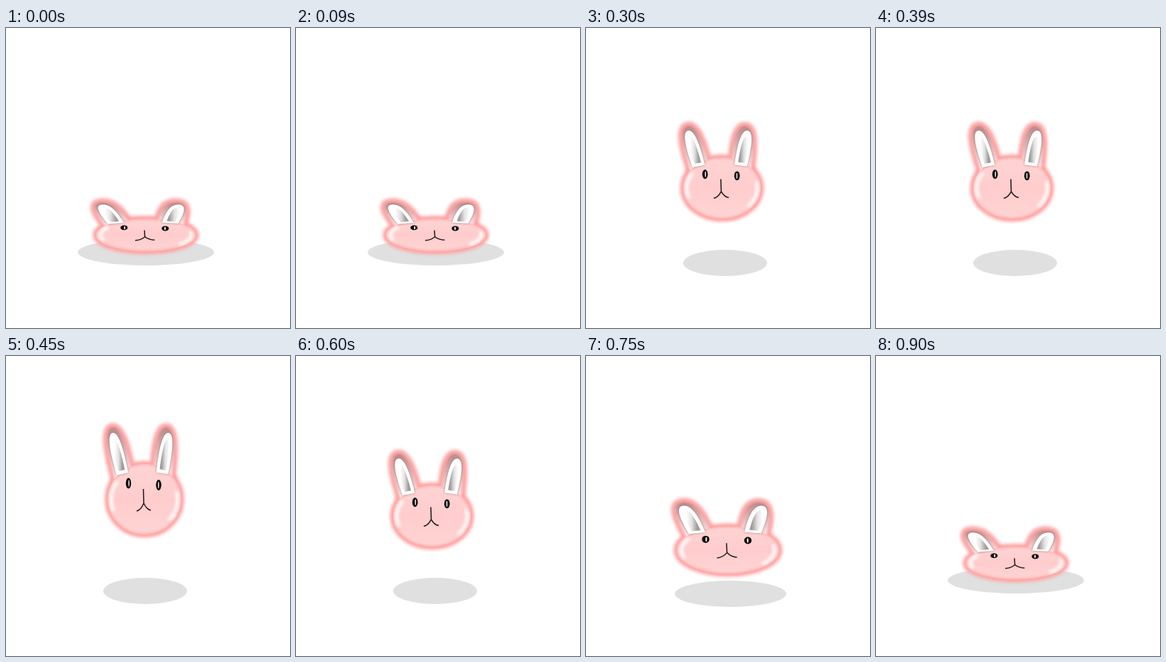
An HTML page with a canvas that plays this animation: 400 px wide and 422 px high, repeating every 1050 ms.

```html
<!DOCTYPE html>
<html lang="en">
<head>
<meta charset="utf-8">
<title>Bouncing bunny</title>
<style>
  html, body { margin: 0; width: 100%; height: 100%; overflow: hidden; background: #fff; }
  canvas { display: block; }
</style>
</head>
<body>
<canvas id="stage" width="400" height="422"></canvas>
<script>
const ctx = document.getElementById('stage').getContext('2d');
const STEP = 150;

// One bunny, squashed and stretched around its chin, from ground to top of the jump.
const poses = [
  { x: 197, y: 314, sx: 1.365, sy: 0.46, shadow: { x: 197, y: 315.5, r: 96 } },
  { x: 200, y: 306, sx: 1.4, sy: 0.668, shadow: { x: 203.5, y: 334.5, r: 78.5 } },
  { x: 191.5, y: 268, sx: 1.06, sy: 0.865, shadow: { x: 196, y: 330.5, r: 59 } },
  { x: 195, y: 251, sx: 1, sy: 1, shadow: { x: 196, y: 330.5, r: 59 } }
];

function ellipse(x, y, rx, ry, from = 0, to = 2 * Math.PI) {
  const path = new Path2D();
  path.ellipse(x, y, rx, ry, 0, from, to);
  return path;
}

// Rounded tongue with a flat base, running from (bx, by) up to (tx, ty).
function tongue(tx, ty, bx, by, w) {
  const dx = tx - bx, dy = ty - by, len = Math.hypot(dx, dy);
  const at = (u, v) => [bx + dx * v - dy / len * w * u, by + dy * v + dx / len * w * u];
  const path = new Path2D();
  path.moveTo(...at(-1, 0));
  path.bezierCurveTo(...at(-1.1, 0.4), ...at(-1.2, 1), ...at(0, 1));
  path.bezierCurveTo(...at(1.2, 1), ...at(1.1, 0.4), ...at(1, 0));
  path.closePath();
  return path;
}

function gradient(x0, y0, x1, y1, ...colors) {
  const g = ctx.createLinearGradient(x0, y0, x1, y1);
  colors.forEach((c, i) => g.addColorStop(i / (colors.length - 1), c));
  return g;
}

// Shapes are relative to the chin at (0, 0).
const body = ellipse(0, -49.5, 51.5, 49.5);
const ears = [tongue(-46, -152, -28, -75, 14), tongue(31, -152, 25, -75, 14)];
const innerEars = [
  { rim: tongue(-45, -143, -31, -85, 8.5), core: tongue(-42.5, -133, -32, -90, 4.5),
    shade: gradient(-42, 0, -31, 0, '#fff', '#e4e2e2', '#a09b9b') },
  { rim: tongue(34, -143, 25, -86, 8.5), core: tongue(32.5, -133, 26, -91, 4.5),
    shade: gradient(24, 0, 35, 0, '#a09b9b', '#e4e2e2', '#fff') }
];
const eyes = [[-22.5, -72], [20, -69.5]];
const mouth = new Path2D('M-1.5-64L-1-44Q-5-34-11-33M-1-44Q3-35 9-34');
const shines = [ellipse(0, -49.5, 47, 44, 2.75, 3.75), ellipse(0, -49.5, 47, 44, -0.25, 0.75)];

function drawBunny({ x, y, sx, sy }) {
  const matrix = new DOMMatrix([sx, 0, 0, sy, x, y]);

  function fill(path, color, shadowBlur = 0) {
    ctx.save();
    ctx.setTransform(matrix);
    ctx.shadowColor = 'rgba(90, 60, 60, .55)';
    ctx.shadowBlur = shadowBlur;
    ctx.fillStyle = color;
    ctx.fill(path);
    ctx.restore();
  }

  // Outlines keep their width while the shape is squashed.
  function stroke(path, color, width, blur = 0, clip = null) {
    const placed = shape => {
      const result = new Path2D();
      result.addPath(shape, matrix);
      return result;
    };
    ctx.save();
    if (clip) ctx.clip(placed(clip));
    if (blur) ctx.filter = `blur(${blur}px)`;
    ctx.strokeStyle = color;
    ctx.lineWidth = width;
    ctx.stroke(placed(path));
    ctx.restore();
  }

  for (const path of [...ears, body]) stroke(path, '#ffa3a3', 9, 2);

  for (const ear of ears) {
    fill(ear, gradient(0, -150, 0, -80, '#bd8989', '#e6b9b9', '#ffe6e6'));
    stroke(ear, '#f9a9a9', 3, 1.2, ear);
  }

  fill(body, gradient(0, -99, 0, 0, '#ffd4d4', '#ffcccc', '#ffd4d4'));
  stroke(body, '#ffb0b0', 3, 1.5, body);
  for (const shine of shines) stroke(shine, '#fff', 4.5, 2, body);

  for (const { rim, core, shade } of innerEars) {
    fill(rim, '#fff', 3);
    fill(core, shade);
  }

  eyes.forEach(([ex, ey], i) => {
    fill(ellipse(ex, ey, 3.7, 7.5), '#090909');
    fill(ellipse(ex + (i ? -0.2 : 0.6), ey, 0.8, 4.8), '#eee');
  });
  stroke(mouth, '#1c1717', 1.5);
}

function drawShadow({ x, y, r }) {
  ctx.fillStyle = '#e0e0e0';
  ctx.fill(ellipse(x, y, r, 18.5));
}

const start = performance.now();
function frame() {
  const step = Math.floor((performance.now() - start) / STEP) % 7;
  const pose = poses[3 - Math.abs(step - 3)];
  ctx.clearRect(0, 0, 400, 422);
  drawShadow(pose.shadow);
  drawBunny(pose);
  requestAnimationFrame(frame);
}
frame();
</script>
</body>
</html>
```
